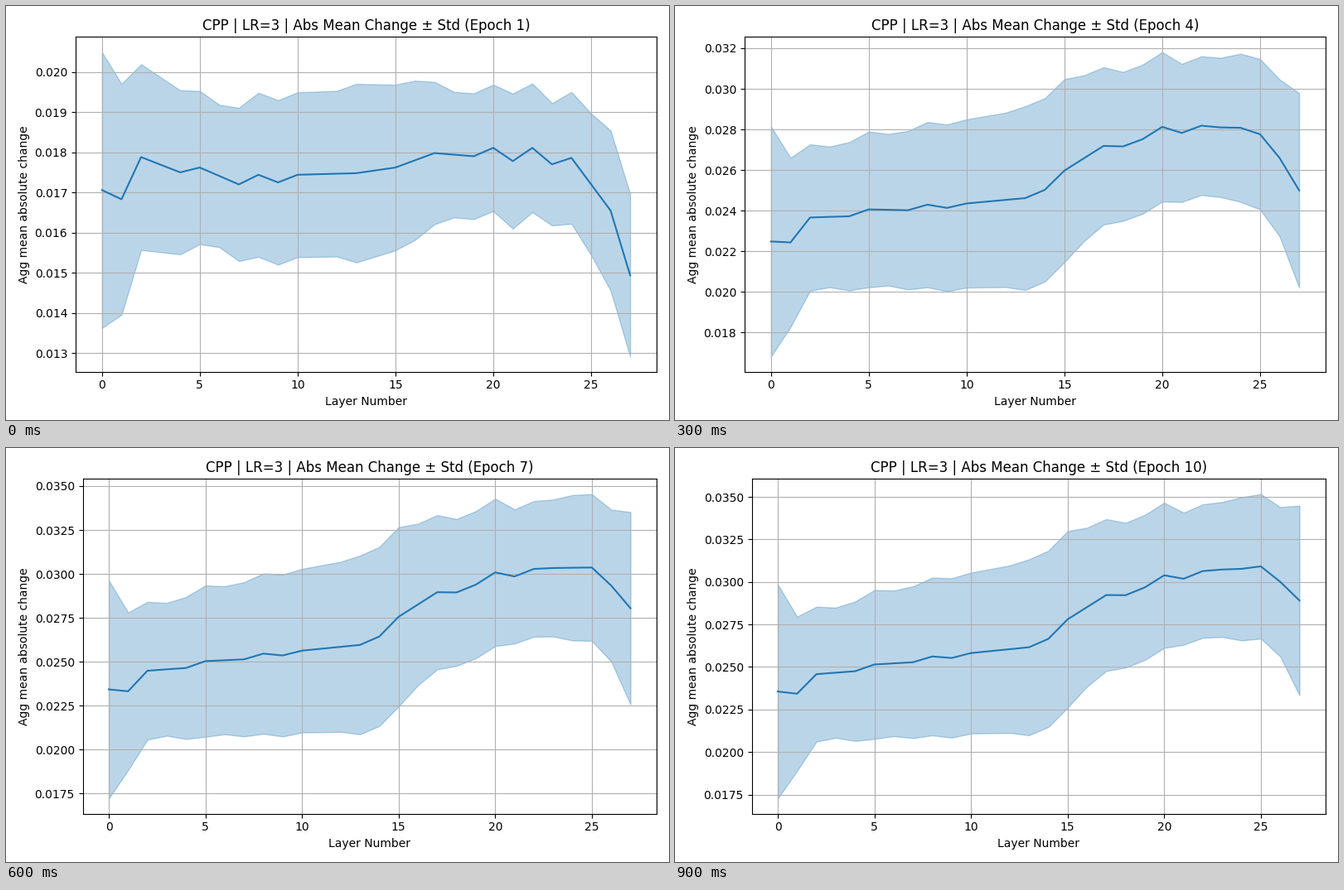
Write a matplotlib script that moves like this. It is 800x500 px and loops after 1 s.

```python
import matplotlib.pyplot as plt
import numpy as np
from matplotlib.animation import FuncAnimation

LAYERS = np.arange(28)
UNIT = 1e-5


def along_layers(points):
    """Join a few layer: value points with straight lines."""
    return np.interp(LAYERS, list(points), list(points.values()))


START_MEAN = along_layers({
    0: 1706, 1: 1683, 2: 1788, 4: 1750, 5: 1762, 7: 1720, 8: 1744, 9: 1725,
    10: 1744, 13: 1748, 15: 1762, 17: 1798, 19: 1790, 20: 1811, 21: 1778,
    22: 1811, 23: 1770, 24: 1786, 26: 1655, 27: 1494})
MEAN_GAIN = along_layers({
    0: 650, 2: 670, 7: 808, 13: 868, 14: 910, 15: 1018, 17: 1125, 18: 1128,
    20: 1228, 22: 1253, 23: 1303, 24: 1291, 25: 1371, 26: 1346, 27: 1397})
START_STD = along_layers({
    0: 343, 2: 231, 6: 177, 8: 204, 12: 206, 13: 222, 16: 198, 18: 156,
    20: 157, 21: 168, 23: 152, 25: 176, 26: 199, 27: 202})
STD_GAIN = along_layers({
    0: 286, 1: 166, 3: 165, 5: 247, 10: 268, 15: 313, 16: 269, 20: 270,
    21: 220, 24: 257, 26: 240, 27: 355})

# Share of the total change still to come at each epoch;
# early layers use it up faster than late ones.
REMAINING = [1, 0.544, 0.31, 0.175, 0.098, 0.051, 0.022, 0.006, 0.001, 0]
SPEED = along_layers({0: 1.03, 2: 1.14, 5: 1.11, 10: 1, 20: 0.97, 24: 0.9, 27: 0.73})


def curves(index):
    rest = REMAINING[index]
    mean = START_MEAN + MEAN_GAIN * (1 - rest ** SPEED)
    # The spread settles slightly later than the mean.
    std = START_STD + STD_GAIN * (1 - rest * (1 + 0.3 * (1 - rest)))
    return mean * UNIT, std * UNIT


def draw(index):
    mean, std = curves(index)
    fig.clear()
    ax = fig.add_subplot()
    ax.plot(LAYERS, mean)
    ax.fill_between(LAYERS, mean - std, mean + std, color="C0", alpha=0.3)
    ax.set_title(f"CPP | LR=3 | Abs Mean Change ± Std (Epoch {index + 1})")
    ax.set_xlabel("Layer Number")
    ax.set_ylabel("Agg mean absolute change")
    ax.grid(True)
    fig.tight_layout()
    return []


fig = plt.figure(figsize=(8, 5), dpi=100)
anim = FuncAnimation(fig, draw, frames=len(REMAINING), interval=100, repeat=True,
                     repeat_delay=0, init_func=lambda: draw(0))
plt.show()
```
